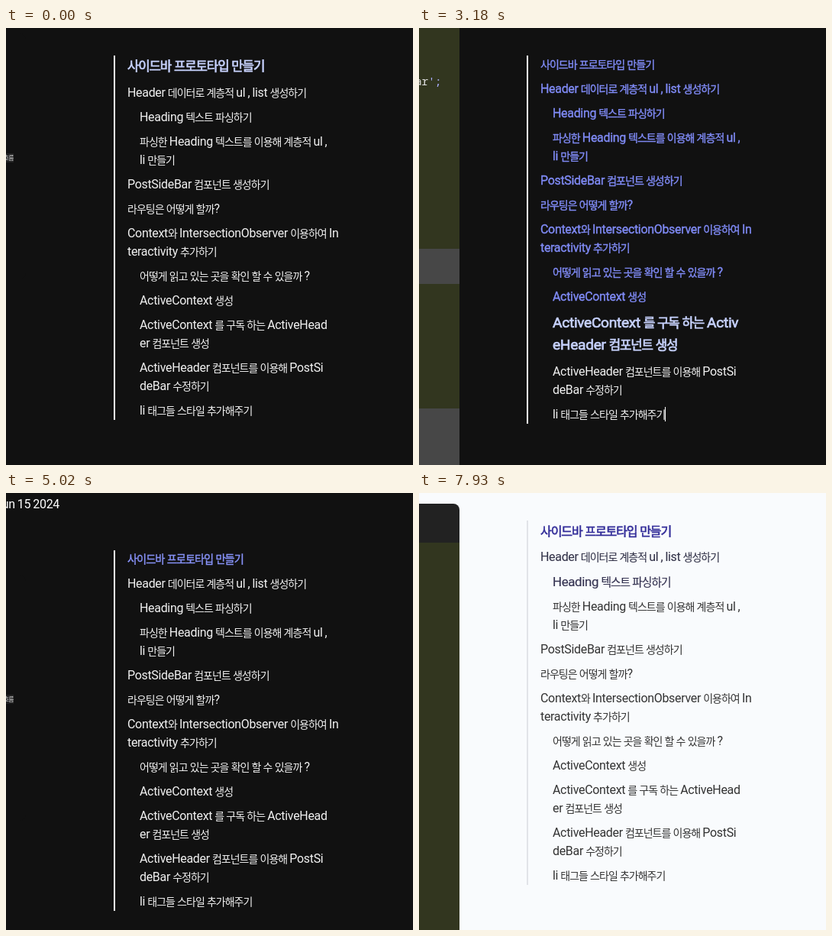
An HTML page for the animation above (8 s loop, 533 by 572 pixels).

```html
<!DOCTYPE html>
<html lang="ko">
<head>
<meta charset="utf-8">
<style>
  :root {
    --light: 0%;
    --bg: color-mix(in srgb, #111, #f9fbfd var(--light));
    --text: color-mix(in srgb, #f1f1f1, #333 var(--light));
    --read: color-mix(in srgb, #818cf8, #312e81 var(--light));
    --active: color-mix(in srgb, #c7d2fe, #3730a3 var(--light));
    --rule: color-mix(in srgb, #fff, #e2e4e8 var(--light));
    --date: color-mix(in srgb, #fff, #312e81 var(--light));
  }
  html, body { margin: 0; width: 100%; height: 100%; overflow: hidden; }
  body {
    position: relative; background: var(--bg); color: var(--text);
    font: 16px/1.5 Roboto, 'Noto Sans CJK KR', 'Noto Sans CJK', sans-serif;
    letter-spacing: -.02em; word-spacing: -.033em;
  }
  b {
    font: inherit; font-size: .875em; line-height: 0; letter-spacing: -.07em;
    font-family: 'Noto Sans CJK KR', 'Noto Sans CJK', sans-serif;
  }
  #page, #page div, #page span, #toc, #caret, svg { position: absolute; }
  #page { left: 0; top: 0; width: 53px; }
  #page div { left: -20px; width: 73px; }
  .block { background: #222; border-radius: 0 8px 8px 0; overflow: hidden; }
  .line { background: var(--text); }
  .code { white-space: pre; font: 15px/20px 'Noto Sans Mono', monospace; letter-spacing: -.03em; color: #ddd; }
  .code i { font-style: normal; color: #aaaefa; }
  #page .image { width: 46px; top: 107px; height: 322px; background: #111; border-radius: 0 8px 8px 0; }
  .label { right: 43px; top: 264px; font-size: 9px; line-height: 12px; color: #ddd; background: #222; white-space: pre; }
  .date { right: -17px; top: 3px; color: var(--date); white-space: pre; }
  #toc { left: 141px; border-left: 2px solid var(--rule); padding-left: 16px; }
  #toc p { margin: 0 0 8px; white-space: pre; line-height: 1.5; }
  #toc p.sub { margin-left: 16px; }
  #toc p:last-of-type { margin-bottom: 0; }
  #caret { left: 179px; bottom: 2.6px; width: 1px; height: 19px; background: #fff; }
  svg { left: 0; top: 0; overflow: visible; }
</style>
</head>
<body>
<div id="page"></div>
<div id="toc"></div>
<svg id="pointer" width="12" height="19"><path d="M.5 .5V15.5L4 12.2L6.5 18L9 17L6.6 11.3H11.3Z" fill="#fff" stroke="#000"/></svg>
<svg id="autoscroll" width="9" height="12"><circle cx="523" cy="60" r="2"/><path d="M518.5 65H527.5L523 69.5Z"/></svg>
<script>
const LOOP = 8000, FADE = 360;
const $ = id => document.getElementById(id);

// A leading ">" marks a nested entry.
const entries = [
  '사이드바 프로토타입 만들기',
  'Header 데이터로 계층적 ul , list 생성하기',
  '>Heading 텍스트 파싱하기',
  '>파싱한 Heading 텍스트를 이용해 계층적 ul ,\nli 만들기',
  'PostSideBar 컴포넌트 생성하기',
  '라우팅은 어떻게 할까?',
  'Context와 IntersectionObserver 이용하여 In\nteractivity 추가하기',
  '>어떻게 읽고 있는 곳을 확인 할 수 있을까 ?',
  '>ActiveContext 생성',
  '>ActiveContext 를 구독 하는 ActiveHead\ner 컴포넌트 생성',
  '>ActiveHeader 컴포넌트를 이용해 PostSi\ndeBar 수정하기',
  '>li 태그들 스타일 추가해주기'
];
const REWRAPPED = 9;

// [time, current entry, enlarged]
const states = [
  [0, 0, 1], [2290, 2, 1], [2360, 4, 1], [2430, 6, 1], [2480, 7, 1], [2540, 9, 1],
  [3560, 8, 1], [3750, 7, 1], [3900, 5, 0], [4277, 5, 1], [4450, 2, 1],
  [4600, 0, 0], [4953, 0, 1], [7810, 2, 1]
];

// [time, value...]
const scrollKeys = [
  [1800, 100], [2000, 230], [2200, 650], [2270, 650], [2550, 4500], [2620, 4500], [2900, 7000],
  [3510, 7000], [4270, 4000], [4340, 4000], [4410, 3700], [4480, 3700], [4800, 900], [5020, 0]
];
const pointerKeys = [
  [200, 412, 543], [740, 263, 382], [900, 263, 382], [1020, 357, 398],
  [1800, 357, 398], [2200, 428, 395], [2270, 428, 395], [2500, 540, 385]
];

const clamp = x => Math.min(1, Math.max(0, x));
const smooth = x => x * x * (3 - 2 * x);

function track(keys, t) {
  const next = keys.findIndex(k => k[0] > t);
  if (next < 0) return keys.at(-1).slice(1);
  if (next === 0) return keys[0].slice(1);
  const a = keys[next - 1], b = keys[next];
  const f = (t - a[0]) / (b[0] - a[0]);
  return a.slice(1).map((v, i) => v + (b[i + 1] - v) * f);
}

// Each state change fades the value towards its new target.
const fade = (t, target) => states.reduce((v, [start, current, on], i) =>
  i === 0 ? target(current, on)
          : v + (target(current, on) - v) * smooth(clamp((t - start) / FADE)), 0);

const markup = text => text.replace(/[가-힣]+/g, '<b>$&</b>');

const items = entries.map(entry => {
  const p = document.createElement('p');
  if (entry[0] === '>') p.className = 'sub';
  p.innerHTML = markup(entry.replace('>', ''));
  $('toc').append(p);
  return p;
});
$('toc').insertAdjacentHTML('beforeend', '<div id="caret"></div>');
const narrow = items[REWRAPPED].innerHTML;
const wide = markup('ActiveContext 를 구독 하는 Activ\neHeader 컴포넌트 생성');

const box = (cls, top, height, inner = '') =>
  `<div class="${cls}" style="top:${top}px;height:${height}px">${inner}</div>`;
const band = (top, height, color) =>
  `<div style="left:0;top:${top}px;height:${height}px;background:${color}"></div>`;
const code = (top, right, text) =>
  `<span class="code" style="top:${top}px;right:${right}px">${text}</span>`;
const GREEN = '#32361f', GRAY = '#474747';

$('page').innerHTML =
  '<span class="date">Jun 15 2024</span>' +
  '<div class="image"></div><span class="label"><b>흐름</b></span>' +
  box('line', 700, 2) + box('line', 810, 1) +
  box('block', 827, 1100, band(51, 1049, GREEN)) +
  box('block', 2200, 1100, band(51, 1049, GREEN)) +
  box('block', 3712, 1400) + code(3996, 31, "]<i>'&gt;</i>") +
  box('block', 5300, 800, band(51, 749, GREEN)) +
  box('block', 6300, 1400, band(51, 1349, GREEN) + band(989, 46, GRAY) + band(1198, 202, GRAY)) +
  code(7059, 24, "ar<i>';</i>");

function scrollAt(t) {
  if (t < 7210) return track(scrollKeys, t)[0];
  return 813 * clamp((t - 7210) / 720) ** 2;
}

function draw(t) {
  const scroll = scrollAt(t);
  const light = clamp((t - 6550) / 290);
  document.documentElement.style.setProperty('--light', light * 100 + '%');
  $('page').style.transform = `translateY(${-Math.round(scroll)}px)`;
  $('toc').style.top = Math.max(36, 75 - Math.round(scroll)) + 'px';

  items.forEach((p, i) => {
    const big = fade(t, (current, on) => on && current === i ? 1 : 0);
    const read = fade(t, (current, on) => i < current || (i === current && !on) ? 1 : 0);
    const purple = clamp(read + big);
    const share = purple ? big / (read + big) : 0;
    p.style.fontSize = 16 + 3.2 * big + 'px';
    p.style.color = `color-mix(in srgb, var(--text), color-mix(in srgb, var(--read), var(--active) ${share * 100}%) ${purple * 100}%)`;
    p.style.webkitTextStroke = .35 * read + .7 * big + 'px';
    if (i === REWRAPPED) {
      const html = big > .15 ? wide : narrow;
      if (p.dataset.wide !== String(html === wide)) {
        p.innerHTML = html;
        p.dataset.wide = html === wide;
      }
    }
  });

  const blinkOn = t >= 3180 && t < 5890 && Math.floor((t - 3180) / 535) % 2 === 0;
  $('caret').style.display = blinkOn ? '' : 'none';

  const [x, y] = track(pointerKeys, t);
  $('pointer').style.display = t >= 200 && t < 2500 ? '' : 'none';
  $('pointer').style.transform = `translate(${x}px, ${y}px)`;
  $('autoscroll').style.display = t >= 7230 && t < 7900 ? '' : 'none';
}

const start = performance.now();
function tick() {
  draw((performance.now() - start) % LOOP);
  requestAnimationFrame(tick);
}
tick();
</script>
</body>
</html>
```
